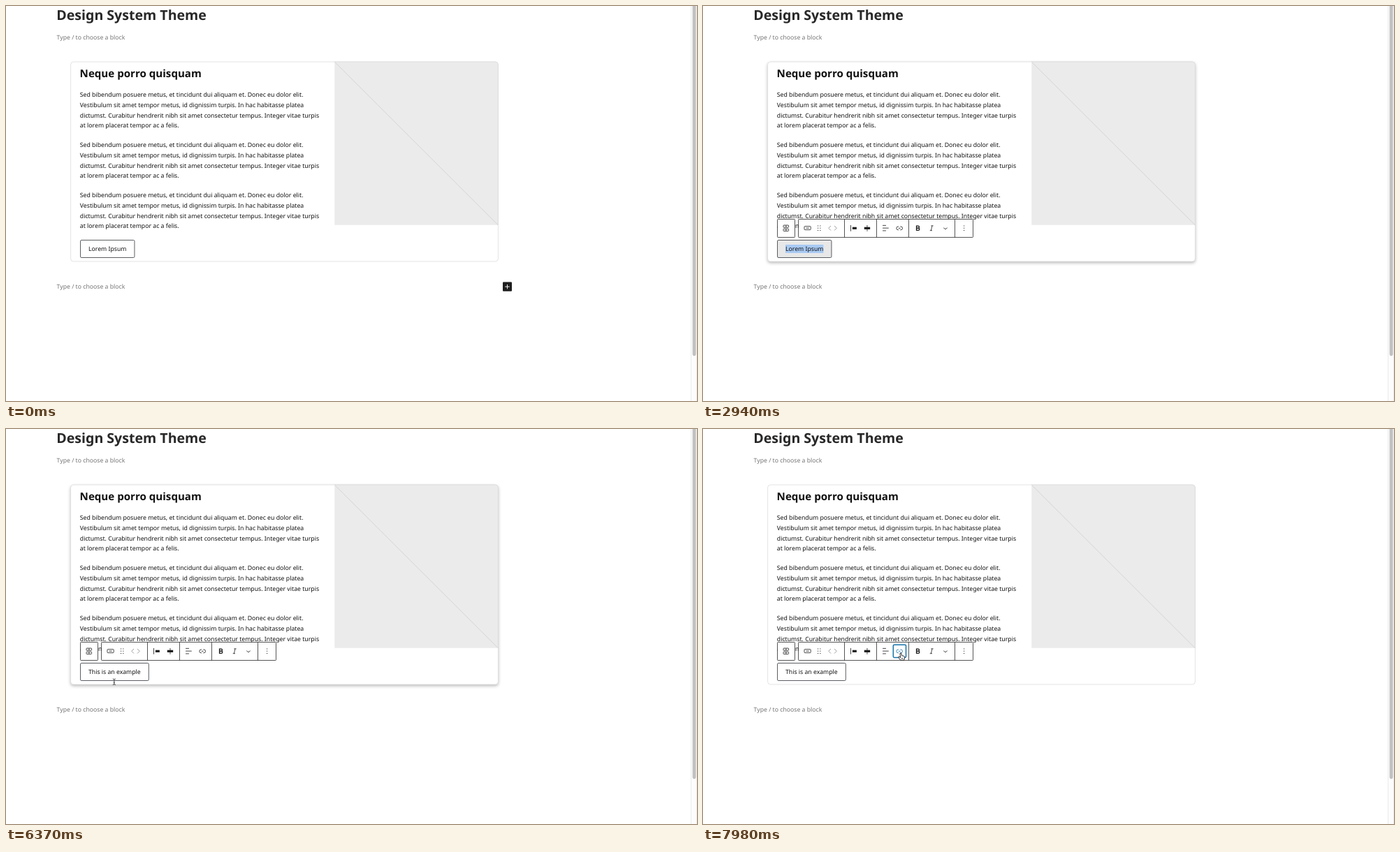
These frames come from a looping animation (989 px wide and 566 px high, 8 s). An HTML page:

```html
<!DOCTYPE html>
<html lang="en">
<head>
<meta charset="utf-8">
<title>Block editor</title>
<style>
  html, body { margin: 0; width: 100%; height: 100%; overflow: hidden; background: #fff; }
  svg { display: block; width: 100vw; height: 100vh; }
  text { font: 8.68px "Noto Sans", sans-serif; white-space: pre; fill: #111; text-rendering: geometricPrecision; }
  #paragraphs text { font-size: 8.71px; }
  .bold { font-weight: 700; }
  .hint { fill: #757575; }
  .panel { fill: #fff; stroke: #1e1e1e; stroke-width: .75; }
  .icon { fill: none; stroke: #1e1e1e; stroke-width: 1.5; }
  .icon .solid { fill: #1e1e1e; stroke: none; }
  .active .link { stroke: #1874ab; }
  .caret { fill: #222; }
</style>
</head>
<body>
<svg viewBox="0 0 989 566">
  <text class="bold" x="72.3" y="19.5" style="font-size:19.57px;fill:#282828">Design System Theme</text>
  <text class="hint" x="72.6" y="47.6">Type / to choose a block</text>

  <rect id="card" x="92.6" y="80" width="611.8" height="286" rx="4" fill="#fff" stroke="#dcdcdc" stroke-width=".8"/>
  <path d="M470.3 80H700.4a4 4 0 0 1 4 4V313.8H470.3Z" fill="#ebebeb"/>
  <path d="M470.3 80 704.2 313.8" stroke="#cfcfcf" stroke-width=".8"/>
  <path d="M470.3 80H700.4a4 4 0 0 1 4 4V313.8" fill="none" stroke="#dcdcdc" stroke-width=".8"/>
  <text class="bold" x="105.6" y="102.4" style="font-size:15.11px">Neque porro quisquam</text>
  <g id="paragraphs"></g>

  <rect id="button" x="106.5" y="335.5" height="25" rx="1.6" stroke="#32373c" stroke-width=".8"/>
  <rect id="selection" y="342" height="12" fill="#a9caf3"/>
  <text id="label" x="118" y="351.2"></text>
  <rect id="labelCaret" class="caret" y="342" width=".8" height="12"/>

  <text class="hint" x="72.6" y="404.9">Type / to choose a block</text>
  <rect id="hintCaret" class="caret" x="72.5" y="396" width=".8" height="11.5"/>
  <g id="inserter">
    <rect x="711" y="395.6" width="13" height="13.2" rx="1" fill="#1e1e1e"/>
    <path d="M714.3 402.2h6.4M717.5 399v6.4" stroke="#fff" stroke-width=".9"/>
  </g>

  <g id="toolbar">
    <rect class="panel" x="106.5" y="305.5" width="25" height="26" rx=".8"/>
    <rect class="panel" x="136.5" y="305.5" width="250" height="26" rx=".8"/>
    <path class="panel" d="M202.5 305.5v26M248.5 305.5v26M294.5 305.5v26M360.5 305.5v26"/>
    <path d="M183 315 179.8 318.3 183 321.6M188 315 191.2 318.3 188 321.6" fill="none" stroke="#949494" stroke-width=".9"/>
    <g id="icons"></g>
    <rect id="focus" x="272.3" y="309.2" width="18.2" height="18.2" rx="1.4" fill="none" stroke="#1874ab" stroke-width="1.5"/>
  </g>

  <rect x="980.6" y="-1" width="8" height="568" fill="#fcfcfc" stroke="#e6e6e6" stroke-width=".8"/>
  <rect x="982.6" y="-4" width="4.9" height="505.5" rx="2.4" fill="#c1c1c1"/>

  <g id="cursor">
    <path id="beam" d="M-2-4.2Q0-4.2 0-3 0-4.2 2-4.2M0-3V3M-2 4.2Q0 4.2 0 3 0 4.2 2 4.2M-1 1H1" fill="none" stroke="#222" stroke-width=".8"/>
    <g id="hand" fill="#fff" stroke="#111" stroke-width=".9" stroke-linejoin="round">
      <path d="M-1 0Q0-1.2 1 0L1.4 3.2 4.8 3.9Q5.8 4.4 5.6 6L4.7 9.8H-.2L-3.2 6Q-3.5 4.4-2 4.8L-.5 6Z"/>
      <path d="M1.2 6.4v2M2.7 6.4v2" stroke-width=".6"/>
    </g>
    <circle id="ring" fill="none" stroke="#111" stroke-width="1.9"/>
  </g>
</svg>
<script>
const LOOP = 8000, STEP = 70, TEXT_X = 118;
const el = Object.fromEntries([...document.querySelectorAll('[id]')].map(node => [node.id, node]));

const lines = [
  'Sed bibendum posuere metus, et tincidunt dui aliquam et. Donec eu dolor elit.',
  'Vestibulum sit amet tempor metus, id dignissim turpis. In hac habitasse platea',
  'dictumst. Curabitur hendrerit nibh sit amet consectetur tempus. Integer vitae turpis',
  'at lorem placerat tempor ac a felis.'
];
el.paragraphs.innerHTML = [0, 1, 2].flatMap(p => lines.map((line, i) =>
  `<text x="105.8" y="${130.2 + p * 71.95 + i * 14.733}">${line}</text>`)).join('');

// Icons are drawn on a 24 unit grid around their centre.
const dots = xs => xs.map(x => [5, 11, 17].map(y => `M${x} ${y}h2v2h-2z`).join('')).join('');
const solid = d => `<path class="solid" d="${d}"/>`;
const line = d => `<path d="${d}"/>`;
const box = (x, y, w, h) => `<rect x="${x}" y="${y}" width="${w}" height="${h}" rx="1.6"/>`;
const icons = [
  [118.8, box(5, 4.2, 14, 6) + box(5, 13.8, 14, 6) + line('M9.5 7.2h5M9.5 16.8h5')],
  [149.6, box(3.5, 7.2, 17, 9.2) + line('M8 11.8h8')],
  [166.2, solid(dots([8, 14]))],
  [215.5, solid('M9 9v6h11V9zM4 20h1.5V4H4z')],
  [235.1, solid('M12.5 15v5H11v-5H4V9h7V4h1.5v5h7v6z')],
  [261.4, line('M4 4.8h9M4 11.8h16M4 18.8h9')],
  [281.2, '<path class="link" d="M10 16.6H8.4a4.4 4.4 0 0 1 0-8.8H10M14 7.8h1.6a4.4 4.4 0 0 1 0 8.8H14M9.5 12.2h5"/>'],
  [307.6, '<path d="M8.3 6.1h4.2a2.9 2.9 0 0 1 0 5.8H8.3zM8.3 11.9h4.8a2.9 2.9 0 0 1 0 5.8H8.3z" stroke-width="2.6"/>'],
  [327.2, line('M10.5 5.7h6M7.5 18.3h6M13.5 5.7 10.5 18.3')],
  [347, line('M7 11 12 15 17 11')],
  [373.6, solid(dots([11]))]
];
el.icons.innerHTML = icons.map(([x, shape]) =>
  `<g class="icon" transform="translate(${x} 318.3) scale(.5417) translate(-12 -12)">${shape}</g>`).join('');

const typed = 'This is an example';
const keyTimes = [3010, 3150, 3290, 3430, 3500, 3710, 3780, 3850, 4200,
                  4340, 4550, 4690, 4900, 5040, 5110, 5320, 5390, 5530];
const pointerPath = [[210, 484, 560], [1120, 153, 347], [6300, 153, 347], [6510, 160, 406],
                     [6580, 160, 406], [6860, 152.4, 347], [7140, 152.4, 347], [7700, 283, 321.5]];
const shadowPath = [[980, 0], [1540, 1], [6370, 1], [6650, 0], [6860, 0], [7420, .8], [7700, 0]];
const rings = [[1260, 17], [1330, 9], [1470, 9], [1890, 9], [6510, 17], [6580, 9],
               [7000, 17], [7070, 9], [7840, 17], [7910, 9]];

function along(path, t) {
  const next = path.findIndex(key => key[0] > t);
  if (next === 0) return path[0].slice(1);
  if (next < 0) return path.at(-1).slice(1);
  const a = path[next - 1], b = path[next], u = (t - a[0]) / (b[0] - a[0]);
  const eased = u * u * (3 - 2 * u);
  return a.slice(1).map((v, i) => v + (b[i + 1] - v) * eased);
}

const within = (t, ...spans) => spans.some(([from, to]) => t >= from && t < to);
const show = (node, visible) => node.setAttribute('visibility', visible ? 'inherit' : 'hidden');
const set = (node, attrs) => { for (const name in attrs) node.setAttribute(name, attrs[name]); };

function measure(text) {
  el.label.textContent = text;
  return text ? el.label.getComputedTextLength() : 0;
}

function drawButton(t, px, py) {
  const text = t < 3010 ? 'Lorem Ipsum' : typed.slice(0, keyTimes.filter(k => k <= t).length);
  const caretWidth = measure(t < 7140 ? text : 'This is a');
  const selectFrom = t < 1890 ? measure('Lorem ') : 0;
  const width = measure(text);
  const right = TEXT_X + width + 12;
  const hover = px > 106 && px < right && py > 335.5 && py < 360.5;
  set(el.button, { width: right - 106.9, fill: hover ? '#e8e8e8' : '#fff' });
  set(el.selection, { x: TEXT_X + selectFrom, width: width - selectFrom });
  show(el.selection, within(t, [1540, 3010]));
  set(el.labelCaret, { x: TEXT_X + caretWidth + .1 });
  show(el.labelCaret, within(t, [3010, 6020], [6510, 6580], [7140, 7640]));
}

function draw(t) {
  const [px, py] = along(pointerPath, t);
  const [shadow] = along(shadowPath, t);
  const toolbar = within(t, [1400, 3010], [6370, 6580], [7140, LOOP]);
  const overToolbar = toolbar && py < 331.5;

  el.card.style.filter = shadow ? `drop-shadow(0 2px 2.3px rgba(0,0,0,${.26 * shadow}))` : 'none';
  drawButton(t, px, py);
  show(el.toolbar, toolbar);
  el.toolbar.classList.toggle('active', overToolbar && px > 272);
  show(el.focus, toolbar && t >= 7910);
  show(el.inserter, within(t, [0, 1400], [6580, 7140]));
  show(el.hintCaret, within(t, [280, 780], [1280, 1400], [6580, 7080]));

  set(el.cursor, { transform: `translate(${px} ${py})` });
  show(el.cursor, within(t, [210, 2940], [6300, LOOP]));
  show(el.beam, !overToolbar);
  show(el.hand, overToolbar);
  const ring = rings.find(([from]) => within(t, [from, from + STEP]));
  show(el.ring, ring);
  if (ring) set(el.ring, { r: ring[1] - .9, opacity: ring[1] > 9 ? .4 : 1 });
}

function tick() {
  const t = performance.now() % LOOP;
  draw(Math.floor(t / STEP) * STEP);
  requestAnimationFrame(tick);
}
tick();
</script>
</body>
</html>
```
